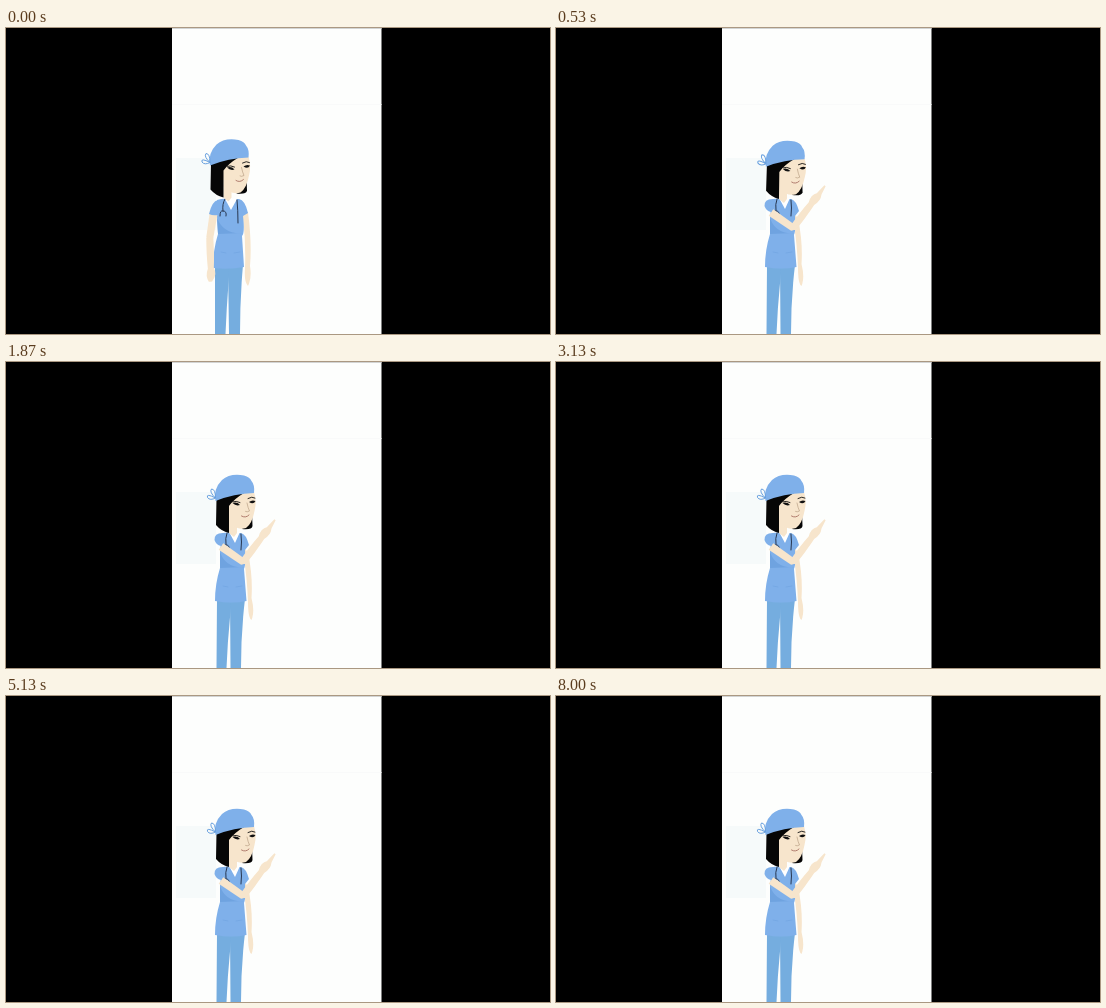
Write an HTML page that moves like this. It is 544 by 306 pixels and loops after 8790 ms.

```html
<!DOCTYPE html>
<html lang="en">
<head>
<meta charset="utf-8">
<title>Nurse pointing</title>
<style>
  html, body { margin: 0; height: 100%; overflow: hidden; background: #000; }
  svg { display: block; width: 544px; height: 306px; }
</style>
</head>
<body>
<svg viewBox="0 0 544 306">
  <rect x="166" width="209.500" height="306" fill="#fdfefd"/>
  <path d="M166 .5H375.500" stroke="#d2d4d4"/>
  <path d="M166 76.500H375.500" stroke="#f9fafa"/>
  <rect x="170" y="130" width="40" height="72" fill="#f6fafa"/>
  <g id="nurse"></g>
</svg>
<script>
const LOOP = 8790;
const SKIN = '#f7e5cc', SHIRT = '#7fb0ea', PANTS = '#75addf', INK = '#27364f', HAIR = '#060606';
const BLINKS = [1130, 2670, 4070, 5800, 7400];
const nurse = document.getElementById('nurse');

const clamp = x => Math.max(0, Math.min(1, x));
const ease = x => { x = clamp(x); return x * x * (3 - 2 * x); };
const mix = (a, b, p) => a + (b - a) * p;

// Blend two paths that share the same commands.
function morph(a, b, p) {
  const target = b.match(/[\d.]+/g);
  let i = 0;
  return a.replace(/[\d.]+/g, n => mix(+n, +target[i++], p).toFixed(2));
}

const shape = (d, fill) => `<path d="${d}" fill="${fill}"/>`;
const line = (d, width = 1, color = INK) =>
  `<path d="${d}" fill="none" stroke="${color}" stroke-width="${width}" stroke-linecap="round"/>`;

function body(p) {
  const m = (a, b) => morph(a, b, p);
  return shape(m('M237 184L242 184Q246 215 244 238Q246 250 242 258Q238 254 239 240Q240 215 237 190Z',
                 'M238 186L242 190Q247 215 245.500 236Q249 250 245.500 258Q242 256 242 240Q241 215 238 198Z'), SKIN)
    + shape(m('M209 237L224 237Q221 270 219.500 306L209 306Z', 'M211 237L226 237Q222 270 220.500 306L210.500 306Z'), PANTS)
    + shape(m('M222 237L237 237Q234 270 234 306L223 306Z', 'M224 237L239 237Q235 270 235 306L224.500 306Z'), PANTS)
    + shape(m('M211 172Q218 170 221 171L233 171Q239 172 242 185L237 188Q239 205 236 208L238 239Q223 242 207 240Q207 222 212 206L211 188Z',
              'M217 171Q222 170 224 171L235 171Q240 172 243 183L239 188Q240 203 238 207L240.500 239Q226 242 209 239Q209 222 214 206L214 188Z'), SHIRT)
    + shape(m('M211 190Q218 207 237 205L212 206Z', 'M214 190Q220 207 239 205L214 206Z'), '#6fa3e0')
    + line(m('M215 224L220 225M228 225L234 224', 'M217 224L222 225M230 225L236 224'), .5, '#6ca1df')
    + shape(m('M219 171L231 171L225 182Z', 'M223 170L234 170L229 181Z'), '#fff')
    + line(m('M219 171Q216 176 217 183M214 188Q214 182 217 183Q221 183 220 188M231 172Q232 182 232 195',
             'M221 171Q219 176 220 183M217 188Q217 182 220 183Q224 183 223 188M235 172Q236 180 235 188'));
}

function arm(p) {
  const tip = mix(44, 53, p);
  return `<g transform="translate(${mix(208, 215, p)} ${mix(183, 184.500, p)}) rotate(${mix(99, 35, p)})">
    ${shape('M0 -4L27 -3.500Q31 0 27 3.500L0 4Z', SKIN)}
    <g transform="translate(27 0) rotate(${mix(-11, -88, p)})">
      ${shape(`M0 -3.500Q18 -4 30 -3Q37 -6 42 -2L${tip} -.8L${tip} .8L44 2.500Q38 6 31 3Q17 4 0 3.500Q-3 0 0 -3.500Z`, SKIN)}
    </g></g>`
    + shape(morph('M212 172Q206 173 203 186Q207 188 212 187Z',
                  'M219 171Q208 170 208.500 178Q210 183 215 184Z', p), SHIRT);
}

function head(p, lid, tilt) {
  const open = 1 - .85 * lid;
  return `<g transform="translate(${mix(-5.500, 0, p)} ${mix(-1.500, 0, p)}) rotate(${tilt} 230 168)">`
    + shape('M236 167Q246 168 246.500 164L246 151Z', HAIR)
    + shape('M223 158H231V171L228 175L223 171Z', SKIN)
    + shape('M222 139L240 130H248Q251 140 248.500 149Q246 162 240 166Q231 169 223 160Z', SKIN)
    + shape('M210.500 136L210 163Q215 169 223 171V144Q228 137 238 131L224 132Z', HAIR)
    + line('M227 139.800Q230 138.500 234 140.500M242 136.500Q246 134 249 136', .9, '#111')
    + `<g transform="translate(0 ${142 * (1 - open)}) scale(1 ${open})">`
    + shape('M226.500 141Q231 139.500 234 143Q230 144.500 226.500 141Z', '#111')
    + shape('M243 140Q246 137.500 249.500 139Q247.500 143 243 140Z', '#111') + '</g>'
    + line('M241 141Q242 146 243.500 149Q241 150.500 239.500 149.500', .5, '#a08568')
    + line('M235.500 154Q239.500 156.500 243 153', .9, '#a97164')
    + shape('M209.500 139Q207 127 216 118Q224 111 238 113.500Q244 115 245.500 119Q249 123 248 131Q228 131.500 209.500 139Z', SHIRT)
    + line('M209.500 136Q203 130 205.500 127Q209.500 127 209.500 136Q200 131 201.500 135.500Q204 139 209.500 136', 1, '#68a0df')
    + '</g>';
}

function draw(now) {
  const t = now % LOOP;
  const p = ease((t - 40) / 470);
  const lid = Math.max(...BLINKS.map(s => ease((t - s) / 130) * (1 - ease((t - s - 200) / 200))));
  const settle = 1 - ease((t - 1000) / 500);
  nurse.innerHTML = body(p) + arm(p) + head(p, lid, .8 * p * settle + .4 * lid);
  requestAnimationFrame(draw);
}
draw(0);
</script>
</body>
</html>
```
